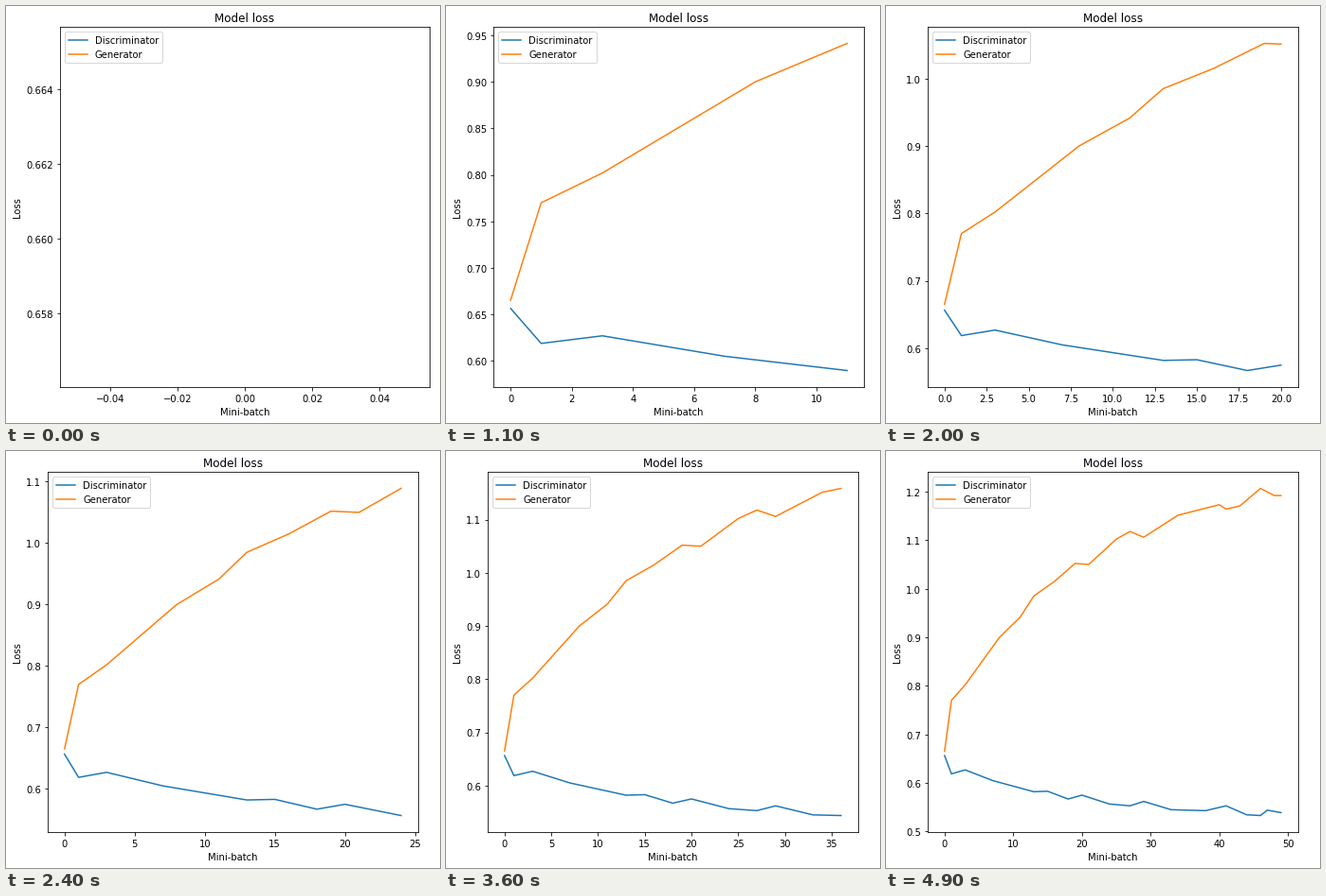
Animation, 458 px wide and 441 px high, one loop 5 s. Source, as a matplotlib script:

```python
import matplotlib.pyplot as plt
import numpy as np
from matplotlib.animation import FuncAnimation
from matplotlib.transforms import Affine2D

WIDTH, HEIGHT, DPI = 458, 441, 72
BATCHES = 50
AXES_W, AXES_H, AXES_BOTTOM = 390.6, 380.52, 38.2
LEFT, DIGIT_W = 56.75, 6.36
TEXT_SHIFT = Affine2D().translate(0, -0.85)

# Turning points of each loss curve: (mini-batch, loss)
DISCRIMINATOR = [
    (0, .65647), (1, .6188), (3, .627), (7, .605), (13, .582), (15, .583),
    (18, .567), (20, .575), (24, .5567), (27, .553), (29, .562), (33, .545),
    (38, .543), (41, .553), (44, .5345), (46, .533), (47, .544), (49, .539),
]
GENERATOR = [
    (0, .66523), (1, .770), (3, .802), (8, .900), (11, .9413), (13, .985),
    (16, 1.015), (19, 1.052), (21, 1.050), (25, 1.102), (27, 1.118),
    (29, 1.106), (34, 1.1515), (40, 1.173), (41, 1.164), (43, 1.1705),
    (46, 1.2066), (48, 1.192),
]


def loss_curve(points):
    return np.interp(np.arange(BATCHES), *zip(*points))


curves = {"Discriminator": loss_curve(DISCRIMINATOR),
          "Generator": loss_curve(GENERATOR)}

plt.rcParams["font.family"] = "DejaVu Sans"
# The tiny margin guards against rounding down a pixel
fig = plt.figure(figsize=((WIDTH + 1e-6) / DPI, (HEIGHT + 1e-6) / DPI),
                 dpi=DPI, facecolor="white")
ax = fig.add_axes([0.1, AXES_BOTTOM / HEIGHT, AXES_W / WIDTH, AXES_H / HEIGHT])


def place_axes(tick_labels):
    """Shift the axes so the y label keeps its distance from the left edge."""
    chars = max(len(label.get_text()) for label in tick_labels)
    left = LEFT - DIGIT_W * (5 - chars)
    ax.set_position([left / WIDTH, AXES_BOTTOM / HEIGHT,
                     AXES_W / WIDTH, AXES_H / HEIGHT])


def update(frame):
    ax.clear()
    for name, loss in curves.items():
        ax.plot(loss[:frame + 1], label=name)
    ax.set_title("Model loss")
    ax.set_xlabel("Mini-batch")
    ax.set_ylabel("Loss")
    legend = ax.legend(loc="upper left")

    x_labels, y_labels = ax.get_xticklabels(), ax.get_yticklabels()
    place_axes(y_labels)
    # The x label is laid out below its tick labels and follows them
    for text in [ax.title, ax.yaxis.label, *x_labels, *y_labels,
                 *legend.get_texts()]:
        text.set_transform(text.get_transform() + TEXT_SHIFT)


anim = FuncAnimation(fig, update, frames=BATCHES, interval=100,
                     repeat=True, repeat_delay=0)
plt.show()
```
